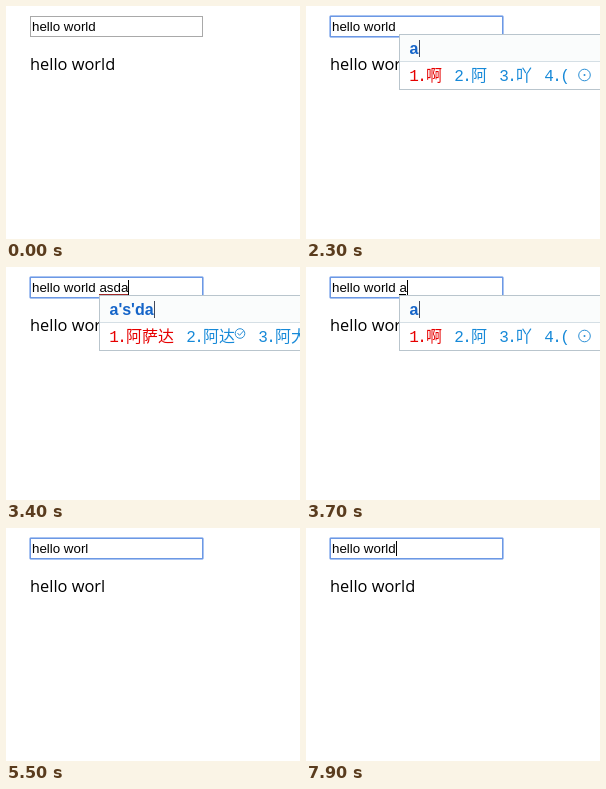
Write an HTML page that moves like this. It is 294x233 px and loops after 8000 ms.

```html
<!DOCTYPE html>
<html lang="en">
<head>
<meta charset="utf-8">
<title>Typing with an input method</title>
<style>
  html, body { margin: 0; width: 100%; height: 100%; overflow: hidden; background: #fff; }
  svg { display: block; }
  text { white-space: pre; }
  .field { font: 13.333px "Liberation Sans", Arial, sans-serif; }
  .echo { font: 16.4px "Open Sans", "Noto Sans", sans-serif; }
  .pinyin { font: bold 16px "Liberation Sans", Arial, sans-serif; fill: #1464c8; }
  .choice { font: 300 16px "Liberation Mono", "Noto Sans CJK SC", "Noto Sans CJK", monospace; }
  .icon { fill: none; stroke: #2a8fd6; }
</style>
</head>
<body>
<svg id="stage" width="294" height="233" viewBox="0 0 294 233">
  <rect id="ring" x="23.5" y="9.5" width="174" height="22" rx="1.5" fill="none" stroke="#a9c4f2"/>
  <rect id="border" x="24.5" y="10.5" width="172" height="20" fill="#fff" stroke="#a9a9a9"/>
  <text id="field" class="field" x="26" y="25"></text>
  <rect id="underline" y="27" height="1"/>
  <rect id="caret" y="13" width="1" height="15"/>
  <text id="echo" class="echo" x="24" y="64"></text>
  <g id="popup">
    <rect x=".5" y="28.5" width="330" height="55" fill="#fff" stroke="#b9c5cd"/>
    <rect x="1" y="29" width="329" height="26" fill="#fafcfc"/>
    <rect x="1" y="55" width="329" height="1" fill="#d5dfe5"/>
    <text id="pinyin" class="pinyin" x="10.5" y="48"></text>
    <rect id="popupCaret" y="34" width="1" height="17" fill="#40485a"/>
    <g id="choices"></g>
  </g>
</svg>
<script>
const LOOP = 8000;
const SVG = "http://www.w3.org/2000/svg";
const $ = id => document.getElementById(id);

const lists = {
  "a": ["啊", "阿", "吖", "( ⊙"],
  "a's": ["阿斯", "啊是", "爱上", "按时"],
  "a's'd": ["阿斯顿", "爱上的", "暗示的"],
  "a's'da": ["阿萨达", "阿达✓", "阿大", "阿"],
  "d": ["的", "都", "到", "大", "等"]
};

// Each step changes only the listed properties.
const steps = [
  [0, { text: "hello world", typed: "", echo: "hello world", focus: false, caret: false, pinyin: "", left: 93 }],
  [1300, { focus: true, caret: true }],
  [1800, { text: "hello world " }],
  [2300, { pinyin: "a", caret: false }],
  [2400, { typed: "a", caret: true }],
  [2500, { pinyin: "a's", typed: "as" }],
  [2600, { pinyin: "a's'd" }],
  [2700, { typed: "asd" }],
  [3200, { pinyin: "a's'da" }],
  [3300, { typed: "asda" }],
  [3500, { pinyin: "a's'd", typed: "asd" }],
  [3700, { pinyin: "a", typed: "a" }],
  [3900, { typed: "" }],
  [4000, { pinyin: "" }],
  [4200, { text: "hello world" }],
  [4400, { text: "hello worl" }],
  [4500, { echo: "hello worl", caret: false }],
  [5000, { caret: true }],
  [5500, { caret: false }],
  [6000, { pinyin: "d", left: 82 }],
  [6100, { typed: "d", caret: true }],
  [6600, { text: "hello world", typed: "", echo: "hello world", pinyin: "" }],
  [7100, { caret: false }],
  [7400, { focus: false }],
  [7900, { focus: true, caret: true }]
];

let current = {};
const states = steps.map(([time, change]) => [time, current = { ...current, ...change }]);

function add(tag, attrs, content = "") {
  const node = document.createElementNS(SVG, tag);
  for (const key in attrs) node.setAttribute(key, attrs[key]);
  node.textContent = content;
  $("choices").append(node);
}

function show(id, on) {
  $(id).style.display = on ? "" : "none";
}

function drawChoices(list) {
  $("choices").replaceChildren();
  let x = 11;
  list.forEach((word, i) => {
    for (const char of `${i + 1}.${word}`) {
      if (char === "✓") {
        add("circle", { class: "icon", cx: x + 5, cy: 66.5, r: 4.8 });
        add("path", { class: "icon", d: `M${x + 2.5} 66l2 2.3l4-4.3` });
        x += 11;
      } else if (char === "⊙") {
        add("circle", { class: "icon", cx: x + 7.5, cy: 69, r: 5.8 });
        add("circle", { cx: x + 7.5, cy: 69, r: 1, fill: "#2a8fd6" });
        x += 16;
      } else {
        const half = char < "\x7f";
        const fill = i ? "#1689d8" : "#e60000";
        add("text", { class: "choice", x: half ? x - 0.8 : x, y: 75, fill }, char);
        x += half ? 8 : 16;
      }
    }
    x += 13;
  });
}

function draw(s) {
  const field = $("field");
  field.textContent = s.text;
  const start = 26 + field.getComputedTextLength();
  field.textContent = s.text + s.typed;
  const end = 26 + field.getComputedTextLength();
  $("echo").textContent = s.echo;

  show("ring", s.focus);
  $("border").setAttribute("stroke", s.focus ? "#6c98e4" : "#a9a9a9");
  show("caret", s.focus && s.caret);
  $("caret").setAttribute("x", Math.round(end));
  $("underline").setAttribute("x", Math.round(start));
  $("underline").setAttribute("width", Math.round(end - start));
  $("underline").setAttribute("fill", s.typed.length > 1 ? "#a02828" : "#000");

  show("popup", s.pinyin);
  if (!s.pinyin) return;
  $("popup").setAttribute("transform", `translate(${s.left})`);
  $("pinyin").textContent = s.pinyin;
  $("popupCaret").setAttribute("x", Math.round(11 + $("pinyin").getComputedTextLength()));
  drawChoices(lists[s.pinyin]);
}

let shown;
const origin = performance.now();
function tick() {
  const time = (performance.now() - origin) % LOOP;
  const state = states.findLast(([start]) => start <= time)[1];
  if (state !== shown) draw(shown = state);
  requestAnimationFrame(tick);
}
tick();
</script>
</body>
</html>
```
